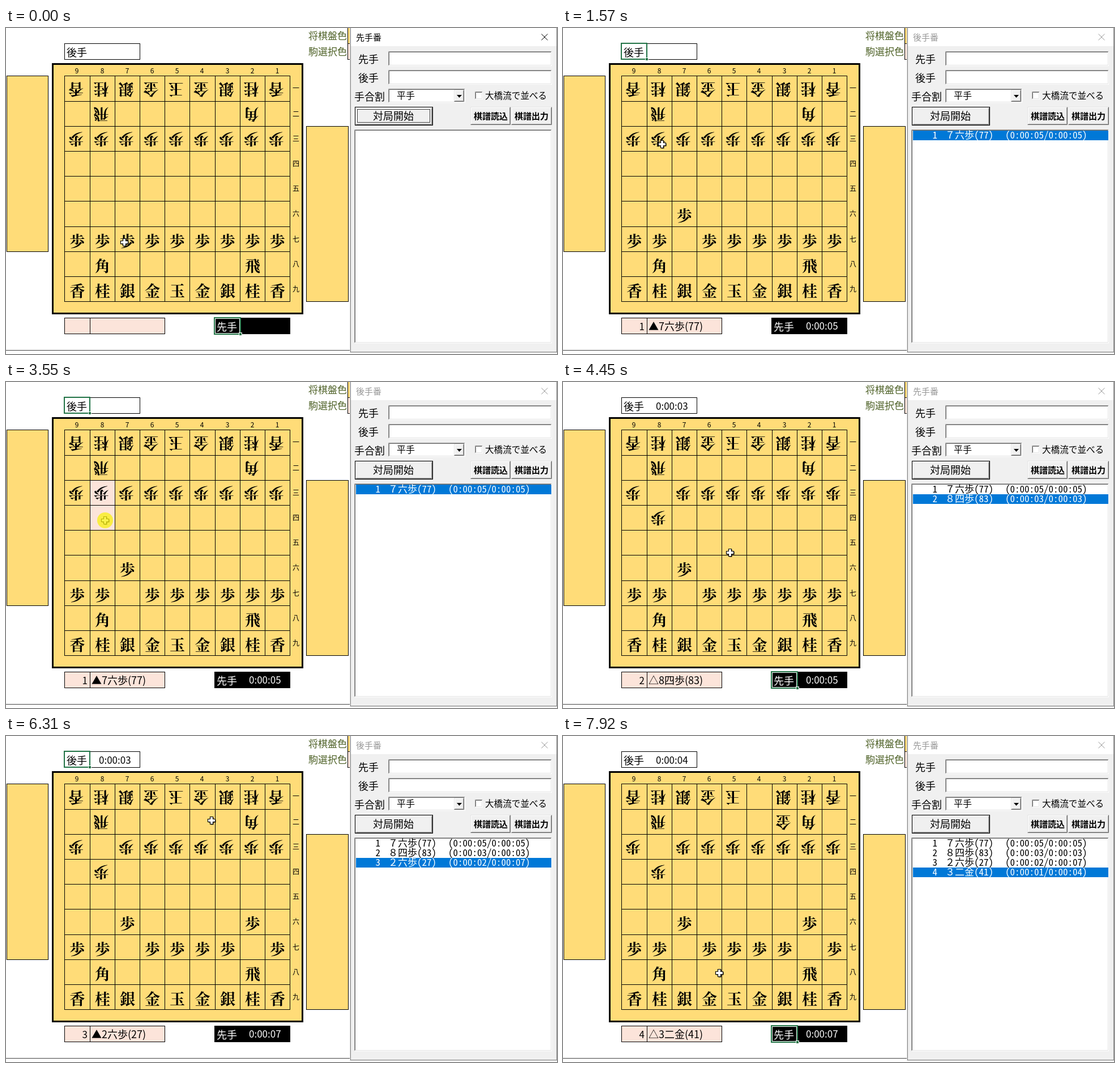
Animation of 973x575 px, one loop 7990 ms. Source, as an HTML page:

```html
<!DOCTYPE html>
<html lang="ja">
<head>
<meta charset="utf-8">
<title>将棋盤</title>
<style>
html, body { margin: 0; width: 100%; height: 100%; overflow: hidden; background: #fff; }
svg { display: block; width: 973px; height: 575px; }
text { font-family: "Noto Sans CJK JP", "Noto Sans CJK", sans-serif; white-space: pre; }
.piece { font-family: "Noto Serif CJK JP", "Noto Sans CJK JP", "Noto Sans CJK", serif; font-weight: 600; }
.mono { font-family: "Noto Sans Mono CJK JP", "Noto Sans CJK JP", "Noto Sans Mono", monospace; font-weight: 300; }
</style>
</head>
<body>
<svg id="stage" viewBox="0 0 973 575"></svg>
<script>
const LOOP = 7990;
const WOOD = '#ffdc78', PINK = '#fce4da', FACE = '#f0f0f0', OLIVE = '#4f6228';
const stage = document.getElementById('stage');

const set = (el, attrs) => {
  for (const k in attrs) el.setAttribute(k, attrs[k]);
  return el;
};
const add = (tag, attrs, parent = stage) =>
  parent.appendChild(set(document.createElementNS('http://www.w3.org/2000/svg', tag), attrs));
const fill = (x, y, width, height, color) => add('rect', { x, y, width, height, fill: color });
const box = (x, y, w, h, color, stroke = '#000') =>
  add('rect', { x: x + .5, y: y + .5, width: w, height: h, fill: color, stroke });
const path = (d, stroke = '#000', extra) => add('path', { d, stroke, fill: 'none', ...extra });
const text = (str, x, cy, size, extra) => {
  const el = add('text', { x, y: cy + size * .38, 'font-size': size, ...extra });
  el.textContent = str;
  return el;
};
const show = (el, on) => { el.style.display = on ? '' : 'none'; };

// Two-pixel bevel: outer and inner colours for the top-left and bottom-right edges
function bevel(x, y, w, h, color, [a, b, c, d]) {
  fill(x, y, w, h, color);
  const edge = (i, tl, br) => {
    const l = x + i + .5, t = y + i + .5, r = x + w - i - .5, m = y + h - i - .5;
    path(`M${l} ${m}V${t}H${r}`, tl);
    path(`M${l} ${m}H${r}V${t}`, br);
  };
  edge(0, a, c);
  edge(1, b, d);
}
const sunken = (x, y, w, h) => bevel(x, y, w, h, '#fff', ['#a0a0a0', '#696969', '#fff', '#e3e3e3']);
const raised = (x, y, w, h) => bevel(x, y, w, h, FACE, ['#e3e3e3', '#fff', '#696969', '#a0a0a0']);

// Board geometry: column 9 is leftmost, row 1 is on top
const gx = i => Math.round(103.3 + 44.2 * i);
const gy = j => Math.round(84.3 + 44.2 * j);
const cell = ([col, row]) => {
  const x = gx(9 - col), y = gy(row - 1);
  return { x, y, w: gx(10 - col) - x, h: gy(row) - y };
};
const TURN = [{ x: 368, y: 511, w: 46, h: 29 }, { x: 103, y: 27, w: 45, h: 28 }];

const moves = [
  { pick: 40, drop: 730, from: [7, 7], to: [7, 6], note: '7六歩(77)', row: '７六歩(77)', spent: '0:00:05', total: '0:00:05' },
  { pick: 1750, drop: 3550, from: [8, 3], to: [8, 4], note: '8四歩(83)', row: '８四歩(83)', spent: '0:00:03', total: '0:00:03' },
  { pick: 5000, drop: 5620, from: [2, 7], to: [2, 6], note: '2六歩(27)', row: '２六歩(27)', spent: '0:00:02', total: '0:00:07' },
  { pick: 6500, drop: 7230, from: [4, 1], to: [3, 2], also: [[4, 2], [5, 2]], note: '3二金(41)', row: '３二金(41)', spent: '0:00:01', total: '0:00:04' }
];
const clicks = moves.flatMap(m => [m.pick, m.drop]);

// Pointer keys: time, x, y
const track = [
  [0, 209, 378], [200, 209, 378], [530, 211, 337], [900, 211, 337],
  [1200, 193, 272], [1500, 175, 208], [1570, 175, 205], [1960, 175, 205],
  [2330, 175, 244], [3950, 175, 244], [4200, 228, 266], [4450, 295, 301],
  [4570, 312, 311], [4680, 330, 320], [4950, 436, 376], [5150, 436, 376],
  [5400, 436, 346], [5480, 436, 342], [5930, 436, 342], [6240, 372, 171],
  [6440, 347, 108], [6700, 347, 108], [7100, 385, 148], [7440, 385, 148], [7920, 276, 418]
];

// Sheet
fill(0, 0, 973, 575, '#fff');
fill(0, 568, 609, 1, '#444');
text('将棋盤色', 534, 14, 17, { fill: OLIVE });
text('駒選択色', 534, 42, 17, { fill: OLIVE });
box(603, -1, 20, 28, WOOD);
box(603, 27, 20, 28, PINK);
box(1, gy(0), 73, gy(7) - gy(0), WOOD);
box(530, gy(2), 74, gy(9) - gy(2), WOOD);
add('rect', { x: 82.5, y: 63.5, width: 441, height: 440, fill: WOOD, stroke: '#000', 'stroke-width': 3 });

const marks = [0, 1, 2, 3].map(() => fill(0, 0, 0, 0, PINK));
for (let i = 0; i < 10; i++) {
  path(`M${gx(i) + .5} ${gy(0)}V${gy(9) + 1}M${gx(0)} ${gy(i) + .5}H${gx(9) + 1}`);
}
[...'987654321'].forEach((n, i) => text(n, gx(i) + 22, 75, 12, { 'text-anchor': 'middle' }));
[...'一二三四五六七八九'].forEach((n, i) => text(n, 512, gy(i) + 22.5, 12, { 'text-anchor': 'middle' }));

// Pieces
const pieces = {};
function place(el, [col, row], flip) {
  const c = cell([col, row]);
  const x = c.x + c.w / 2 + (flip ? -2 : .5), y = c.y + c.h / 2 + (flip ? 1.5 : 3.5);
  el.setAttribute('transform', `translate(${x} ${y})${flip ? ' rotate(180)' : ''}`);
}
function piece(name, col, row) {
  pieces[[col, row]] = text(name, 0, 0, 27, { class: 'piece', 'text-anchor': 'middle' });
  place(pieces[[col, row]], [col, row], row < 5);
}
[...'香桂銀金玉金銀桂香'].forEach((name, i) => {
  piece(name, i + 1, 1);
  piece(name, i + 1, 9);
  piece('歩', i + 1, 3);
  piece('歩', i + 1, 7);
});
piece('飛', 8, 2);
piece('角', 2, 2);
piece('角', 8, 8);
piece('飛', 2, 8);

// Status cells
box(103, 27, 133, 28, '#fff');
text('後手', 107, 43, 18);
const clockB = text('', 164, 43, 17);
box(103, 511, 177, 28, PINK);
path('M148.5 512V540');
const count = text('', 144, 527, 17, { 'text-anchor': 'end' });
const note = text('', 151, 526, 18);
box(368, 511, 133, 28, '#000');
text('先手', 372, 527, 18, { fill: '#fff' });
const clockA = text('', 429, 526, 17, { fill: '#fff' });

// Selected cell
const halo = add('rect', { fill: 'none', stroke: '#fff' });
const frame = add('rect', { fill: 'none', stroke: '#217346', 'stroke-width': 2 });
const knob = add('rect', { width: 5, height: 5, fill: '#217346', stroke: '#fff' });
function select({ x, y, w, h }) {
  set(halo, { x: x + 1.5, y: y + 1.5, width: w - 3, height: h - 3 });
  set(frame, { x, y, width: w, height: h });
  set(knob, { x: x + w - 2.5, y: y + h - 2.5 });
}

// Dialog
fill(607, 0, 366, 573, '#dcdcdc');
fill(608, 0, 365, 572, '#858585');
fill(609, 0, 363, 571, FACE);
fill(609, 0, 363, 32, '#fff');
const title = text('', 618, 16, 15);
const cross = path('M945.5 10.5L956.5 21.5M956.5 10.5L945.5 21.5');
text('先手', 622, 55, 18);
text('後手', 622, 88, 18);
text('手合割', 615, 121, 18);
sunken(675, 41, 289, 26);
sunken(675, 74, 289, 26);
sunken(675, 107, 136, 25);
text('平手', 690, 119, 16);
raised(791, 109, 18, 21);
add('path', { d: 'M796 118H805L800.5 123Z' });
sunken(828, 112, 14, 14);
text('大橋流で並べる', 846, 119, 15.6, { 'font-weight': 300 });
fill(616, 139, 138, 33, '#000');
raised(617, 140, 136, 31);
text('対局開始', 648, 155, 18);
const focus = add('rect', { x: 620.5, y: 143.5, width: 128, height: 23, fill: 'none', stroke: '#444' });
raised(820, 139, 71, 32);
raised(892, 139, 72, 32);
text('棋譜読込', 826, 155, 15, { 'font-weight': 700 });
text('棋譜出力', 898, 155, 15, { 'font-weight': 700 });
sunken(615, 179, 349, 377);

const bar = fill(618, 0, 345, 17, '#0078d7');
const rows = moves.map((m, i) => {
  const y = 189 + 17 * i, mono = { class: 'mono' };
  return [
    text(i + 1, 661, y, 17, { class: 'mono', 'text-anchor': 'end' }),
    text(m.row, 675, y, 17, mono),
    text(`(${m.spent}/${m.total})`, 781, y, 17, mono)
  ];
});

// Pointer
const pointer = add('g', {});
const plus = 'M-2.5-6.5h5v4h4v5h-4v4h-5v-4h-4v-5h4z';
add('path', { d: plus, transform: 'translate(1 1)' }, pointer);
add('path', { d: plus, fill: '#fff', stroke: '#000', 'stroke-width': 1.2 }, pointer);
const glow = add('circle', { r: 14, fill: '#f8f010', opacity: .75 });

function pointerAt(t) {
  const i = track.findIndex(k => k[0] > t);
  if (i < 0) return track[track.length - 1].slice(1);
  const [t0, x0, y0] = track[i - 1], [t1, x1, y1] = track[i];
  const k = (t - t0) / (t1 - t0);
  return [Math.round(x0 + (x1 - x0) * k), Math.round(y0 + (y1 - y0) * k)];
}

function draw(t) {
  const within = (a, b) => t >= a && t < b;
  const moved = moves.filter(m => t >= m.drop + 280).length;
  const listed = moves.filter(m => t >= m.drop + 350).length;
  const turn = listed % 2;
  const active = t < 110;

  moves.forEach((m, i) => place(pieces[m.from], i < moved ? m.to : m.from, m.from[1] < 5));

  const held = moves.find(m => within(m.pick + 140, m.drop + 280));
  const lit = held ? [held.from, held.to, ...(held.also || [])] : [];
  marks.forEach((el, i) => {
    show(el, i < lit.length);
    if (i < lit.length) {
      const c = cell(lit[i]);
      set(el, { x: c.x, y: c.y, width: c.w, height: c.h });
    }
  });

  const last = moves[moved - 1];
  count.textContent = last ? moved : '';
  note.textContent = last ? (moved % 2 ? '▲' : '△') + last.note : '';
  const total = side => {
    const own = moves.slice(0, moved).filter((m, i) => i % 2 === side).pop();
    return own ? own.total : '';
  };
  clockA.textContent = total(0);
  clockB.textContent = total(1);

  const from = moves.find(m => within(m.pick + 70, m.pick + 210));
  const to = moves.find(m => within(m.drop + 70, m.drop + 350));
  if (from) select(cell(from.from));
  else if (to) select(cell(to.to));
  else select(TURN[turn]);

  title.textContent = turn ? '後手番' : '先手番';
  title.setAttribute('fill', active ? '#000' : '#999');
  cross.setAttribute('stroke', active ? '#000' : '#999');
  show(focus, active);

  show(bar, listed > 0);
  bar.setAttribute('y', 181 + 17 * (listed - 1));
  rows.forEach((parts, i) => parts.forEach(el => {
    show(el, i < listed);
    el.setAttribute('fill', i === listed - 1 ? '#fff' : '#000');
  }));

  const [x, y] = pointerAt(t);
  pointer.setAttribute('transform', `translate(${x} ${y})`);
  set(glow, { cx: x, cy: y });
  show(glow, clicks.some(c => within(c, c + 140)));
}

function tick() {
  draw(performance.now() % LOOP);
  requestAnimationFrame(tick);
}
tick();
</script>
</body>
</html>
```
